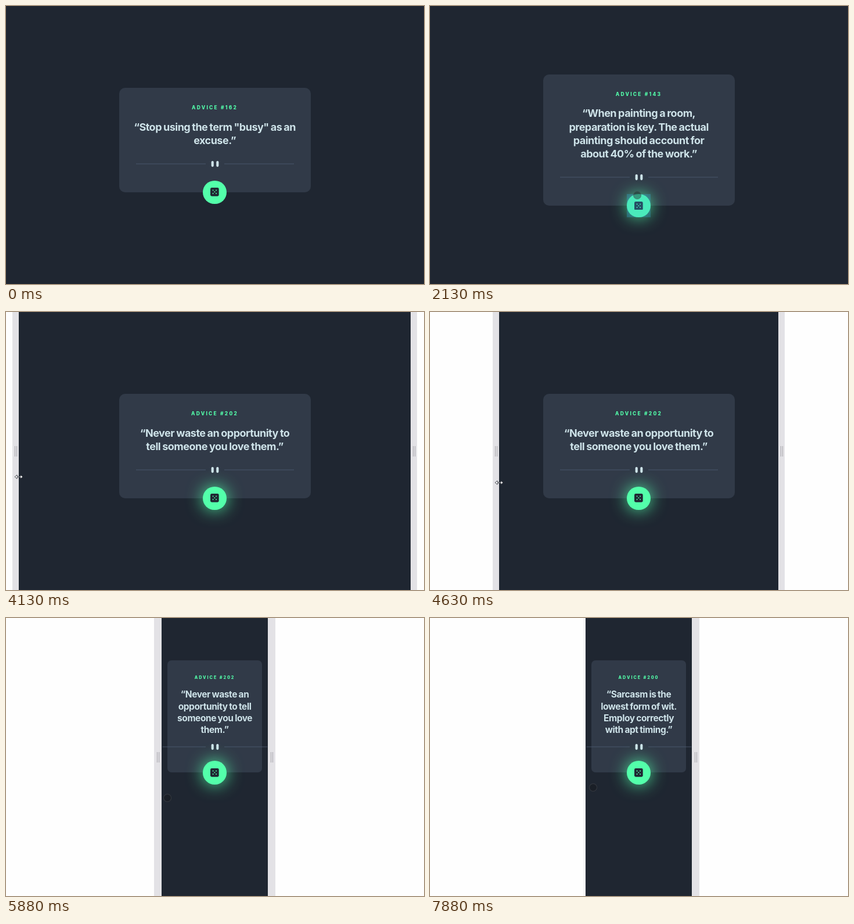
Animation, 720 px wide and 479 px high, one loop 8000 ms. Source, as an HTML page:

```html
<!DOCTYPE html>
<html lang="en">
<head>
<meta charset="utf-8">
<title>Advice generator</title>
<style>
  html, body { margin: 0; width: 100%; height: 100%; overflow: hidden; background: #fefefe; }
  #stage { position: relative; width: 720px; height: 479px; overflow: hidden; }
  #stage div, #stage svg { position: absolute; }
  #page { top: 0; height: 479px; background: #1f2631; }
  .bar { top: 0; height: 479px; background: #e3e2e6; }
  .bar::before {
    content: ""; position: absolute; left: 50%; top: 231px; width: 2px; height: 18px;
    margin-left: -1.5px; border: solid #a7a6ab; border-width: 0 1.2px;
  }
  #edge { left: 263px; top: 0; width: 5px; height: 479px; background: linear-gradient(90deg, #fefefe, #e9e9ec); }
  #card { background: #313a48; border-radius: 10px; }
  #label, #quote { left: -50px; right: -50px; text-align: center; white-space: pre; font-family: Inter, "Open Sans", sans-serif; }
  #label { color: #53ffaa; font-weight: 800; line-height: 12px; letter-spacing: .27em; }
  #quote { color: #cee3e9; font-weight: 700; letter-spacing: -.028em; word-spacing: -.04em; }
  #rule { left: 50%; width: 272px; height: 10px; margin-left: -136px; overflow: visible; }
  #button {
    left: 50%; bottom: -20.5px; width: 40.6px; height: 40.6px; margin-left: -20.2px;
    border-radius: 50%; background: #53ffaa;
  }
  #button svg { left: 12.95px; top: 12.95px; }
  #tap { inset: 0; background: rgba(51, 181, 229, .28); }
  #touch {
    width: 12px; height: 12px; margin: -7px; border-radius: 50%;
    background: rgba(20, 21, 26, .38); border: 1px solid rgba(92, 92, 98, .42);
  }
  #arrow { width: 14px; height: 8px; margin: -4px -7px; overflow: visible; }
</style>
</head>
<body>
<div id="stage">
  <div id="page"></div>
  <div id="edge"></div>
  <div class="bar" id="barL"></div>
  <div class="bar" id="barR"></div>
  <div id="card">
    <div id="label"></div>
    <div id="quote"></div>
    <svg id="rule" viewBox="0 0 272 10">
      <path id="lines" stroke="#4f5d74" stroke-width=".8" />
      <g fill="#cee3e9">
        <rect x="129.6" width="4.2" height="10.2" rx="2.1" />
        <rect x="138.2" width="4.2" height="10.2" rx="2.1" />
      </g>
    </svg>
    <div id="button">
      <svg width="14.7" height="14.7" viewBox="0 0 24 24">
        <rect width="24" height="24" rx="4" fill="#202733" />
        <path d="M7.5 7.5h0M16.5 7.5h0M12 12h0M7.5 16.5h0M16.5 16.5h0" stroke="#53ffaa" stroke-width="3.2" stroke-linecap="round" />
      </svg>
      <div id="tap"></div>
    </div>
  </div>
  <div id="touch"></div>
  <svg id="arrow" viewBox="0 0 14 8">
    <path d="M0 4L4 .8V3.2H10V.8L14 4L10 7.2V4.8H4V7.2Z" fill="#fff" stroke="#20242c" stroke-width=".8" />
  </svg>
</div>
<script>
  const LOOP = 8000, STEP = 125, MID = 359.6;
  const $ = id => document.getElementById(id);
  const px = (id, props) => {
    for (const k in props) $(id).style[k] = props[k] + "px";
  };
  const show = (id, on) => { $(id).style.display = on ? "block" : "none"; };

  // Keys are [time, value, ...values], joined by straight segments.
  function at(keys, t) {
    const i = keys.findIndex(k => k[0] > t);
    if (i < 0) return keys[keys.length - 1].slice(1);
    if (i === 0) return keys[0].slice(1);
    const a = keys[i - 1], b = keys[i], p = (t - a[0]) / (b[0] - a[0]);
    return a.slice(1).map((v, n) => v + (b[n + 1] - v) * p);
  }

  // Half width of the page and width of a drag bar
  const SIZE = [[3900, 376, 11], [4020, 360, 11], [4125, 337.6, 11], [4375, 287.8, 11],
    [4625, 240.5, 11], [5250, 124, 11], [5500, 91.6, 13.3]];
  const TOUCH = [[125, 14, 345], [400, 220, 334], [625, 357, 326], [2800, 357, 326],
    [3100, 240, 312], [3500, 6, 286], [3700, -10, 284], [5600, 266, 309], [5875, 278, 310],
    [6125, 290, 292], [6420, 356, 266], [7000, 356, 266], [7500, 283, 290], [7875, 281, 292]];
  const ARROW_Y = [[4125, 284], [4625, 294], [5250, 308], [5600, 309]];
  const TAPS = [[625, 800], [1375, 1550], [2000, 2250], [6500, 6700]];

  const ADVICE = [
    { from: 0, id: 162, text: ["“Stop using the term \"busy\" as an\nexcuse.”"] },
    { from: 1875, id: 143, text: ["“When painting a room,\npreparation is key. The actual\npainting should account for\nabout 40% of the work.”"] },
    { from: 2750, id: 202, text: [
      "“Never waste an opportunity to\ntell someone you love them.”",
      "“Never waste an opportunity\nto tell someone you love\nthem.”",
      "“Never waste an\nopportunity to tell\nsomeone you love\nthem.”"] },
    { from: 6750, id: 200, text: ["“Sarcasm is the\nlowest form of wit.\nEmploy correctly\nwith apt timing.”"] }
  ];

  function drawCard(t, half) {
    const stacked = half < 184, small = half < 115;
    const width = stacked ? Math.min(330, 2 * half - 19.4) : 330;
    const advice = ADVICE.filter(a => a.from <= t).pop();
    const wrap = width >= 308 ? 0 : width >= 284 ? 1 : 2;
    const text = advice.text[Math.min(wrap, advice.text.length - 1)];
    const pitch = small ? 20.2 : 23.3;
    const height = (small ? 112.2 : 133) + pitch * text.split("\n").length;
    px("card", {
      left: MID - width / 2, width, height,
      top: stacked ? 73.4 : 230.8 - height / 2,
      borderRadius: small ? 7 : 10
    });
    $("label").textContent = "ADVICE #" + advice.id;
    $("quote").textContent = text;
    px("label", { top: small ? 23.6 : 28.3, fontSize: small ? 7.2 : 8.4 });
    px("quote", {
      top: (small ? 59.1 : 67.3) - pitch / 2,
      fontSize: small ? 15.5 : 18, lineHeight: pitch
    });
    px("rule", { top: height - (small ? 44 : 49) - 5 });
    const inset = stacked ? 45.5 : 0;
    $("lines").setAttribute("d", `M${inset} 5H120M152 5H${272 - inset}`);
  }

  function draw(t) {
    const [half, bar] = at(SIZE, t);
    px("page", { left: MID - half, width: 2 * half });
    px("barL", { left: MID - half - bar, width: bar });
    px("barR", { left: MID + half, width: bar });
    show("barL", t < 6000);
    show("edge", t >= 6000);
    drawCard(t, half);

    const glow = Math.min(1, Math.max(0, (t - 600) / 200));
    $("button").style.boxShadow = `0 0 29px rgba(83, 255, 170, ${glow * 0.9})`;
    show("tap", TAPS.some(([a, b]) => t >= a && t < b));

    const dragging = t >= 3875 && t < 5600;
    const [x, y] = at(TOUCH, t);
    px("touch", { left: x, top: y });
    show("touch", t >= 125 && !dragging);
    px("arrow", { left: MID - half - bar + 10.5, top: at(ARROW_Y, t)[0] });
    show("arrow", dragging);
  }

  function tick() {
    const t = performance.now() % LOOP;
    draw(Math.floor(t / STEP) * STEP);
    requestAnimationFrame(tick);
  }
  tick();
</script>
</body>
</html>
```
